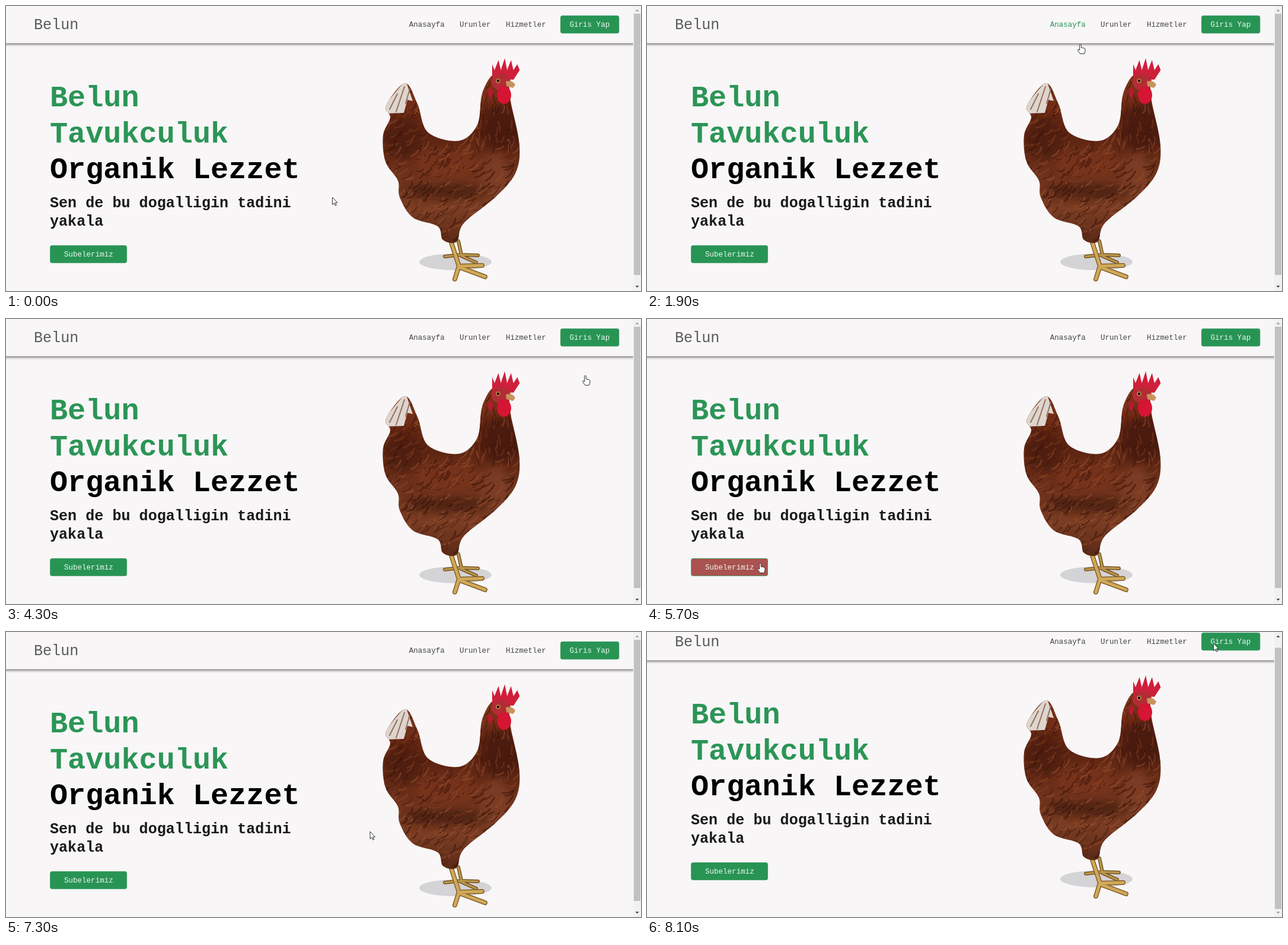
An HTML page that plays this animation: 1071x480 px, repeating every 8.2 s.

```html
<!DOCTYPE html>
<html lang="tr">
<head>
<meta charset="utf-8">
<title>Belun Tavukculuk</title>
<style>
  html, body { margin: 0; width: 100%; height: 100%; overflow: hidden; background: #f8f6f7; }
  svg { display: block; width: 1071px; height: 480px; }
  text { font: 12.54px "Courier New", "Liberation Mono", monospace; fill: #444; white-space: pre; }
  .logo { font-size: 25.1px; fill: #5c5c5c; }
  .title { font-size: 50.2px; font-weight: bold; }
  .sub { font-size: 25.1px; font-weight: bold; fill: #1a1a1c; }
  .on { fill: #eef7f1; }
  .green { fill: #2b9556; }
  .bar { fill: #f8f6f7; filter: drop-shadow(0 1px 2.5px rgba(0, 0, 0, .75)); }
  .btn { fill: #289454; stroke: #289454; stroke-width: .8; }
  .lines { fill: none; stroke-linecap: round; stroke-linejoin: round; }
</style>
</head>
<body>
<svg viewBox="0 0 1071 480">
  <defs>
    <linearGradient id="coat" x1="0" y1="0" x2="0" y2="1">
      <stop offset="0" stop-color="#85351a"/>
      <stop offset=".35" stop-color="#5c2412"/>
      <stop offset=".8" stop-color="#7a3d23"/>
      <stop offset="1" stop-color="#5a2917"/>
    </linearGradient>
    <path id="shape"/>
    <clipPath id="coatClip"><use href="#shape"/></clipPath>
    <filter id="soft"><feGaussianBlur stdDeviation="7"/></filter>
    <path id="backLeg" d="M763 396L768 419M740 422L767 419L796 420M768 421L793 432"/>
    <path id="frontLeg" d="M749 392L764 438L757 460M764 438L803 437M765 440L808 456"/>
  </defs>

  <g id="page">
    <path class="bar" d="M-9 -20H1080V62.700H-9Z"/>
    <text class="logo" x="47" y="38.500">Belun</text>
    <text id="home" x="679.700" y="35">Anasayfa</text>
    <text id="goods" x="765" y="35">Urunler</text>
    <text x="843" y="35">Hizmetler</text>
    <rect class="btn" id="login" x="935.400" y="16.400" width="98.400" height="29.400" rx="3"/>
    <text class="on" x="950.500" y="35">Giris Yap</text>

    <text class="title green" x="74" y="169">Belun</text>
    <text class="title green" x="74" y="229.500">Tavukculuk</text>
    <text class="title" style="fill:#000" x="74" y="289.500">Organik Lezzet</text>
    <text class="sub" x="74" y="339">Sen de bu dogalligin tadini</text>
    <text class="sub" x="74" y="370">yakala</text>
    <rect class="btn" id="branches" x="74.600" y="403.400" width="129" height="29.200" rx="3"/>
    <text class="on" x="98" y="422">Subelerimiz</text>

    <g id="hen">
      <ellipse cx="758" cy="431" rx="61" ry="14" fill="#d4d3d5"/>
      <g class="lines">
        <use href="#backLeg" stroke="#6d4a1c" stroke-width="6"/>
        <use href="#backLeg" stroke="#b8954a" stroke-width="3.500"/>
        <use href="#frontLeg" stroke="#86602a" stroke-width="8"/>
        <use href="#frontLeg" stroke="#d0aa59" stroke-width="5"/>
      </g>
      <use href="#shape" fill="url(#coat)"/>
      <g clip-path="url(#coatClip)">
        <g filter="url(#soft)" opacity=".7">
          <ellipse cx="835" cy="205" rx="35" ry="40" fill="#3f160b"/>
          <ellipse cx="745" cy="265" rx="55" ry="25" fill="#7d351b"/>
          <ellipse cx="825" cy="290" rx="25" ry="42" fill="#83432a"/>
          <ellipse cx="745" cy="312" rx="75" ry="13" fill="#431a0e"/>
          <ellipse cx="670" cy="225" rx="30" ry="35" fill="#4a1e10"/>
        </g>
        <g id="plumes" class="lines" opacity=".55"></g>
        <path fill="#ded5cf" d="M674 125L636 170L642 181L671 180L677 158L686 160Z"/>
        <path class="lines" stroke="#96705c" stroke-width="2" d="M672 136L658 178M660 148L647 174M681 140L674 164"/>
      </g>
      <path id="comb" fill="#cf1f3a"/>
      <ellipse cx="835" cy="128" rx="16" ry="14" fill="#b32c35"/>
      <ellipse cx="840" cy="150" rx="12" ry="15" fill="#d61434"/>
      <ellipse cx="817" cy="146" rx="4" ry="8" fill="#b61a2f"/>
      <path fill="#c9935e" d="M843 127Q855 124 859 133L855 138L844 135Z"/>
      <circle cx="830" cy="126" r="3" fill="#20110c" stroke="#c28a43" stroke-width="1.500"/>
    </g>
  </g>

  <rect x="1057.700" width="14" height="480" fill="#f1f1f1"/>
  <rect id="thumb" x="1059" y="13" width="11" height="440" fill="#c1c1c1"/>
  <path id="up" d="M1061.500 9l3-3.500l3 3.500z"/>
  <path id="down" d="M1061.500 471l3 3.500l3-3.500z"/>

  <g id="pointer" fill="#fff" stroke="#333" stroke-linejoin="round">
    <path id="arrow" d="M.5 0V12.500L3.400 9.800L5.400 14.300L7.300 13.400L5.300 9.200H9Z"/>
    <path id="hand" d="M-1.300 1Q0 -.8 1.300 1V6L6 7Q8 7.600 8 9.500V12L6.500 16.500H-.5L-4 11.500Q-5.200 9 -3 9L-1.300 10.500Z"/>
  </g>
</svg>
<script>
const LOOP = 8200, STEP = 100;
const $ = id => document.getElementById(id);
const clamp = v => Math.max(0, Math.min(1, v));
const INK = [68, 68, 68], GREEN = [40, 148, 84], RED = [169, 82, 79];

// Places the pointer rests at; bow bends the way there downwards.
const stops = [
  { at: 0, until: 0, x: 550, y: 322 },
  { at: 1500, until: 1800, x: 722, y: 34, id: "home", rest: INK, hot: GREEN },
  { at: 2600, until: 2850, x: 794, y: 35, bow: 78, id: "goods", rest: INK, hot: GREEN },
  { at: 3700, until: 4050, x: 980, y: 34, bow: 31, id: "login", rest: GREEN, hot: RED },
  { at: 4300, until: 4300, x: 977, y: 95 },
  { at: 5700, until: 6300, x: 191, y: 411, bow: 30, id: "branches", rest: GREEN, hot: RED },
  { at: 7300, until: 7400, x: 613.5, y: 336 },
  { at: 7700, until: 7800, x: 976, y: 46 },
  { at: 8100, until: LOOP, x: 955, y: 19 }
];
const targets = stops.filter(s => s.id);

let seed = 11;
const rnd = () => (seed = seed * 16807 % 2147483647) / 2147483647;

// Closed smooth curve through "x,y" points
function smooth(list) {
  const p = list.split(" ").map(s => s.split(",").map(Number));
  const at = i => p[(i + p.length) % p.length];
  const lean = (i, j, k) => at(i).map((v, a) => v + (at(j)[a] - at(k)[a]) / 6);
  return "M" + p[0] + p.map((_, i) =>
    `C${lean(i, i + 1, i - 1)} ${lean(i + 1, i, i + 2)} ${at(i + 1)}`).join("");
}

function growHen() {
  $("shape").setAttribute("d", smooth("822,116 803,148 795,200 764,227 712,213 694,165 673,130 "
    + "641,168 648,188 636,218 640,262 661,294 664,322 686,356 728,371 737,394 760,397 772,366 "
    + "825,322 859,282 866,235 852,165 846,130"));

  let comb = "M820 123";
  for (let i = 0; i < 5; i++) {
    const x = 820 + i * 10.6;
    comb += `L${x} ${98 - 10 * Math.sin(Math.PI * i / 4)}L${x + 4} 108`;
  }
  $("comb").setAttribute("d", comb + "L856 124Z");

  const tones = ["#34110a", "#4a1b0e", "#96502e", "#7f3a1e"];
  let plumes = "";
  for (let i = 0; i < 600; i++) {
    const x = 635 + rnd() * 232, y = 115 + rnd() * 280;
    const neck = x > 785 && y < 235;
    const turn = (neck ? 1.7 : 2.5) + (rnd() - .5) * .9;
    const len = (neck ? 6 : 9) + rnd() * 12;
    const dx = Math.cos(turn) * len, dy = Math.sin(turn) * len;
    plumes += `<path d="M${x} ${y}q${dx / 2 + 2} ${dy / 2 + 3} ${dx} ${dy}"
      stroke="${tones[i % 4]}" stroke-width="${1 + rnd() * 2}"/>`;
  }
  $("plumes").innerHTML = plumes;
}

function tipAt(t) {
  const i = stops.findIndex(s => t <= s.until), b = stops[i];
  if (t >= b.at) return [b.x, b.y];
  const a = stops[i - 1], k = (t - a.until) / (b.at - a.until);
  return [a.x + (b.x - a.x) * k, a.y + (b.y - a.y) * k + (b.bow || 0) * Math.sin(Math.PI * k)];
}

function draw(t) {
  $("pointer").setAttribute("transform", `translate(${tipAt(t)})`);
  // The hand lingers a little after the pointer has left
  const isHand = targets.some(s => t >= s.at - 200 && t <= s.until + 300);
  $("hand").style.display = isHand ? "" : "none";
  $("arrow").style.display = isHand ? "none" : "";

  for (const { id, at, until, rest, hot } of targets) {
    const k = clamp((t - at + 200) / 200) - clamp((t - until - 100) / 150);
    $(id).style.fill = `rgb(${rest.map((c, i) => Math.round(c + (hot[i] - c) * k))})`;
  }

  const s = clamp((t - 7400) / 300);
  $("page").setAttribute("transform", `translate(0 ${-15 * s})`);
  $("thumb").setAttribute("y", 13 + 13.5 * s);
  $("up").setAttribute("fill", s > 0 ? "#505050" : "#a3a3a3");
  $("down").setAttribute("fill", s < 1 ? "#505050" : "#a3a3a3");
}

growHen();
const start = performance.now();
function tick() {
  const t = (performance.now() - start) % LOOP;
  draw(Math.floor(t / STEP) * STEP);
  requestAnimationFrame(tick);
}
tick();
</script>
</body>
</html>
```
